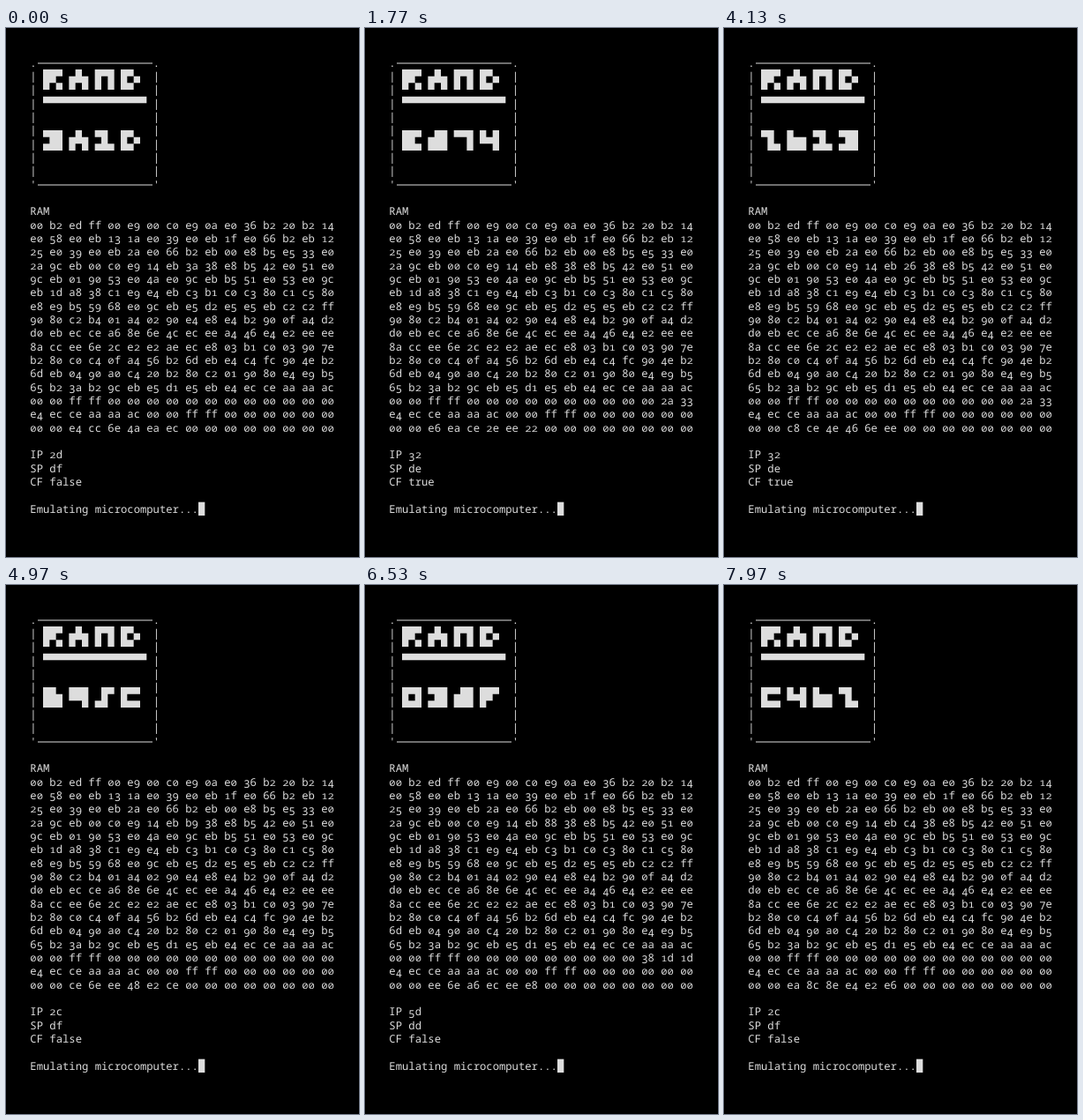
These frames come from a looping animation (400x600 px, 8 s). An HTML page:

```html
<!DOCTYPE html>
<html lang="en">
<head>
<meta charset="utf-8">
<title>Microcomputer emulator</title>
<style>
  html, body { margin: 0; width: 100%; height: 100%; overflow: hidden; background: #000; }
  svg { display: block; width: 400px; height: 600px; }
  text { font: 500 12.22px "Noto Sans Mono", "DejaVu Sans Mono", monospace; text-rendering: geometricPrecision; }
</style>
</head>
<body>
<svg viewBox="0 0 400 600" fill="#ddd">
  <rect width="400" height="600" fill="#000"/>
  <path d="M36 40H166M36 178H166" stroke="#ddd" stroke-width="1.2"/>
  <g id="tall"></g>
  <g id="low" transform="translate(0 2.2)"></g>
  <g id="small" transform="scale(1 .75)"></g>
  <path id="pixels"/>
  <rect id="cursor"/>
</svg>
<script>
const $ = id => document.getElementById(id);
const LOOP = 8000, FPS = 30;
const X = 82 / 3, Y = 31.7, W = 22 / 3, H = 46 / 3, BASE = 12.1;
const SEED = 0x38, FONT = 0x82, STACK = 0xe0, SCREEN = 0xe0, DIGITS = 0xf2;

const image = `
00 b2 ed ff 00 e9 00 c0 e9 0a e0 36 b2 20 b2 14
e0 58 e0 eb 13 1a e0 39 e0 eb 1f e0 66 b2 eb 12
25 e0 39 e0 eb 2a e0 66 b2 eb 00 e8 b5 e5 33 e0
2a 9c eb 00 c0 e9 14 eb 3a 38 e8 b5 42 e0 51 e0
9c eb 01 90 53 e0 4a e0 9c eb b5 51 e0 53 e0 9c
eb 1d a8 38 c1 e9 e4 eb c3 b1 c0 c3 80 c1 c5 80
e8 e9 b5 59 68 e0 9c eb e5 d2 e5 e5 eb c2 c2 ff
90 80 c2 b4 01 a4 02 90 e4 e8 e4 b2 90 0f a4 d2
d0 eb ec ce a6 8e 6e 4c ec ee a4 46 e4 e2 ee ee
8a cc ee 6e 2c e2 e2 ae ec e8 03 b1 c0 03 90 7e
b2 80 c0 c4 0f a4 56 b2 6d eb e4 c4 fc 90 4e b2
6d eb 04 90 a0 c4 20 b2 80 c2 01 90 80 e4 e9 b5
65 b2 3a b2 9c eb e5 d1 e5 eb e4 ec ce aa aa ac
00 00 ff ff 00 00 00 00 00 00 00 00 00 00 00 00
e4 ec ce aa aa ac 00 00 ff ff 00 00 00 00 00 00
00 00 00 00 00 00 00 00 00 00 00 00 00 00 00 00`.trim().split(/\s+/);
const fontNibbles = image.slice(FONT, FONT + 24).join("");

// start tick, number shown, step of the polling loop at that tick
const draws = [
  [0, "3a1d", 2], [24, "7d20", 0], [52, "e874", 3], [84, "41a6", 1], [110, "2613", 5],
  [139, "b95c", 6], [168, "038f", 1], [198, "8844", 5], [227, "c462", 7]
];
const pollStacks = ["", "00", "00", "00", "", "33", "33", "2a33", "2a"];
const busy = [
  { ip: 0x5d, stack: "381d1d", cf: false },
  { ip: 0xa9, stack: "0f02f4e2", cf: true }
];

const hex = n => n.toString(16).padStart(2, "0");

function stateAt(tick) {
  const i = draws.findLastIndex(d => d[0] <= tick);
  const [start, number, first] = draws[i];
  const next = draws[i + 1];
  const left = next ? next[0] - tick : Infinity;
  if (left <= busy.length) {
    const shown = left === 1 ? next[1].slice(0, 2) + number.slice(2) : number;
    return { ...busy[busy.length - left], seed: next[1].slice(0, 2), shown };
  }
  const step = (first + 4 * (tick - start)) % 9;
  return {
    ip: 0x2b + step, stack: pollStacks[step], cf: step > 2 && step < 8,
    seed: number.slice(0, 2), shown: number
  };
}

function memory(s) {
  const ram = image.slice();
  ram[SEED] = s.seed;
  const stack = s.stack.match(/../g) || [];
  const sp = STACK - stack.length;
  stack.forEach((b, i) => ram[sp + i] = b);
  for (let row = 0; row < 3; row++) {
    const bits = [...s.shown].map(d => fontNibbles[row * 16 + parseInt(d, 16)]).join("");
    ram[DIGITS + row * 2] = bits.slice(0, 2);
    ram[DIGITS + row * 2 + 1] = bits.slice(2);
  }
  return { ram, sp };
}

// Old-style figures: 0 1 2 sit at x-height, 3 4 5 7 9 hang below the line.
// Each layer blanks the characters that belong to the others.
const layers = [["tall", /[0-579]/g, 1], ["low", /[^34579]/g, 1], ["small", /[^012]/g, .75]];
const lines = {};

function put(row, str, col = 0) {
  const line = lines[row + ":" + col] ||= { nodes: layers.map(([id, , scale]) => {
    const node = document.createElementNS("http://www.w3.org/2000/svg", "text");
    node.setAttribute("x", X + col * W);
    node.setAttribute("y", (Y + row * H + BASE) / scale);
    return $(id).appendChild(node);
  }) };
  if (line.str === str) return;
  line.str = str;
  layers.forEach(([, others], i) => {
    line.nodes[i].textContent = str.replace(others, " ").replace(/ /g, "\u00a0");
  });
}

function pixelPath(ram) {
  let d = "";
  for (let y = 0; y < 16; y++) {
    const word = parseInt(ram[SCREEN + 2 * y] + ram[SCREEN + 2 * y + 1], 16);
    const bits = word.toString(2).padStart(16, "0");
    for (const run of bits.matchAll(/1+/g)) {
      const w = run[0].length * W;
      d += `M${X + (2 + run.index) * W} ${Y + H + y * H / 2}h${w}v${H / 2}h${-w}z`;
    }
  }
  return d;
}

function setup() {
  for (const col of [0, 19]) {
    put(0, ".", col);
    for (let row = 1; row < 9; row++) put(row, "|", col);
    put(9, "'", col);
  }
  put(11, "RAM");
  put(33, "Emulating microcomputer...");
  const box = { x: X + 26 * W, y: Y + 33 * H, width: W, height: H };
  for (const k in box) $("cursor").setAttribute(k, box[k]);
}

let last = -1;
function draw(t) {
  const tick = Math.floor((t + 5) * FPS / 1000) % (LOOP * FPS / 1000);
  if (tick === last) return;
  last = tick;
  const s = stateAt(tick);
  const { ram, sp } = memory(s);
  for (let r = 0; r < 16; r++) put(12 + r, ram.slice(r * 16, r * 16 + 16).join(" "));
  put(29, "IP " + hex(s.ip));
  put(30, "SP " + hex(sp));
  put(31, "CF " + s.cf);
  $("pixels").setAttribute("d", pixelPath(ram));
}

setup();
const begin = performance.now();
function loop() {
  draw((performance.now() - begin) % LOOP);
  requestAnimationFrame(loop);
}
draw(0);
requestAnimationFrame(loop);
</script>
</body>
</html>
```
